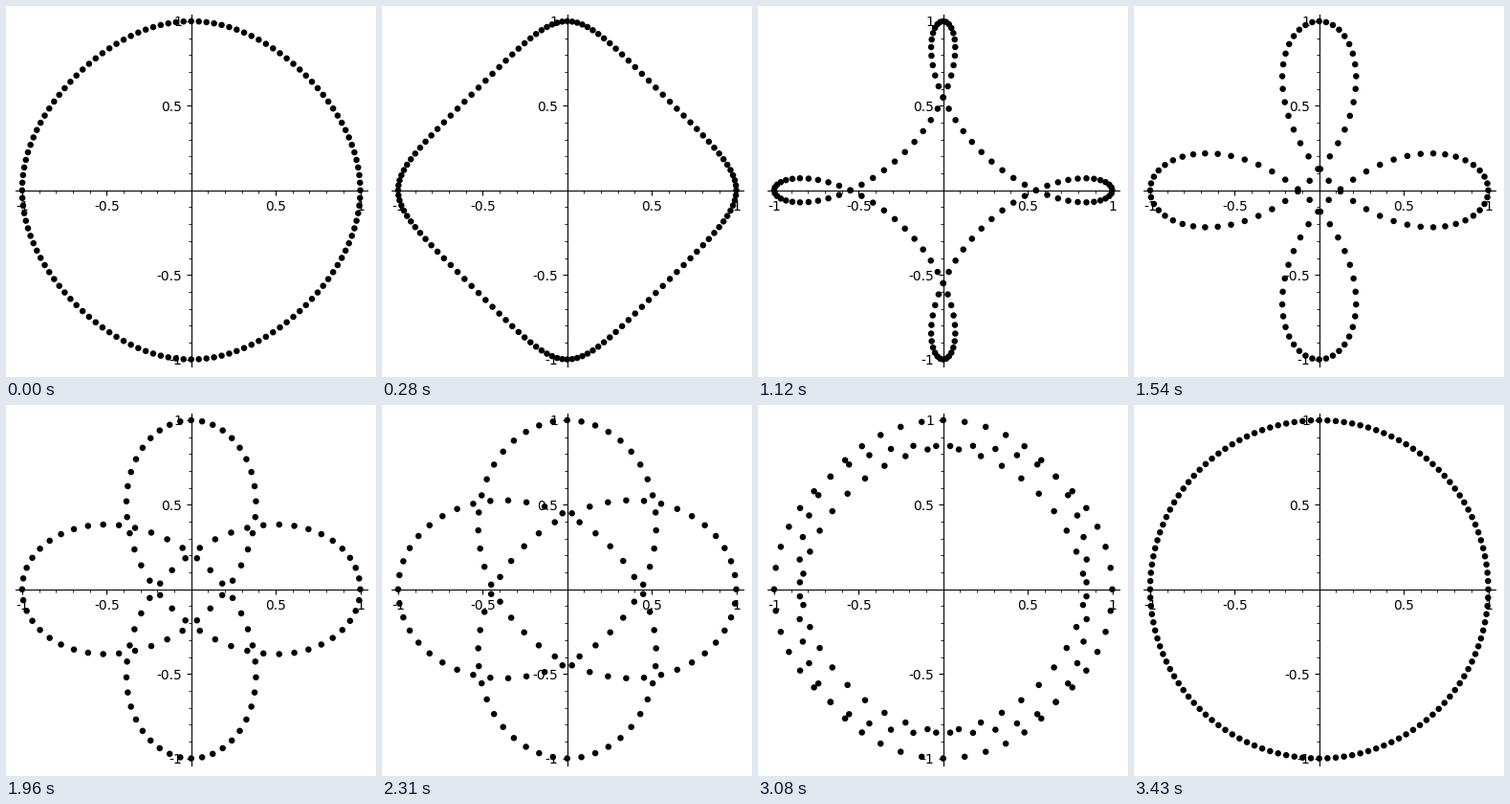
Write a matplotlib script that moves like this. It is 387x388 px and loops after 3500 ms.

```python
import numpy as np
import matplotlib.pyplot as plt
from matplotlib.animation import FuncAnimation
from matplotlib.ticker import FuncFormatter, MultipleLocator

WIDTH, HEIGHT, DPI = 387, 388, 100
CENTER_X, CENTER_Y = 193.7, 192.78   # origin in pixels from the top left
UNIT, LIMIT = 176.83, 1.04
FRAMES, INTERVAL = 50, 70
DOTS = 128

plt.rcParams["font.family"] = "DejaVu Sans"

angles = 2 * np.pi * np.arange(DOTS) / DOTS


def curve(frame):
    """Blend of a forward turn and a triple backward turn."""
    mix = (frame + 1) / FRAMES
    z = (1 - mix) * np.exp(1j * angles) + mix * np.exp(-3j * angles)
    return np.column_stack([z.real, z.imag])


fig = plt.figure(figsize=(WIDTH / DPI, HEIGHT / DPI), dpi=DPI, facecolor="white")
half = UNIT * LIMIT
ax = fig.add_axes([(CENTER_X - half) / WIDTH, 1 - (CENTER_Y + half) / HEIGHT,
                   2 * half / WIDTH, 2 * half / HEIGHT])
ax.set(xlim=(-LIMIT, LIMIT), ylim=(-LIMIT, LIMIT))
ax.patch.set_visible(False)

for side in ("left", "bottom"):
    ax.spines[side].set_position("zero")
for side in ("right", "top"):
    ax.spines[side].set_visible(False)

for axis in (ax.xaxis, ax.yaxis):
    axis.set_ticks([-1, -0.5, 0.5, 1])
    axis.set_major_formatter(FuncFormatter(lambda value, _: f"{value:g}"))
    axis.set_minor_locator(MultipleLocator(0.1))
ax.tick_params(labelsize=10)

# One colour per dot keeps the dots at subpixel positions.
dots = ax.scatter(*curve(0).T, s=10, c=["black"] * DOTS, linewidths=1.5,
                  zorder=5, clip_on=False)


def update(frame):
    dots.set_offsets(curve(frame))
    return (dots,)


anim = FuncAnimation(fig, update, frames=FRAMES, interval=INTERVAL,
                     repeat=True, repeat_delay=0)
plt.show()
```
